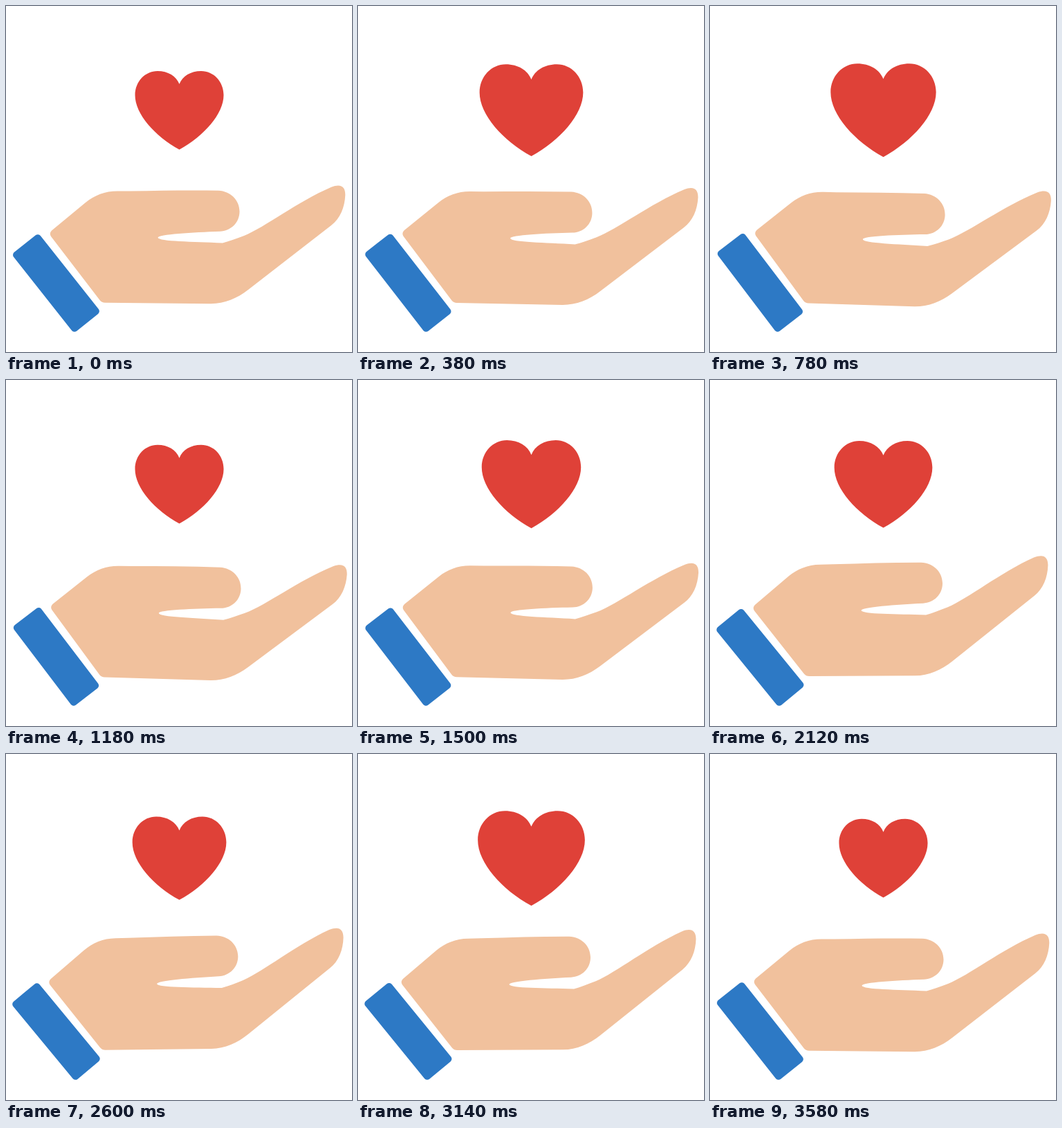
Recreate the animation shown at these times as an HTML page with a canvas. Size 500x500 px, loop 3620 ms.

```html
<!DOCTYPE html>
<html lang="en">
<head>
<meta charset="utf-8">
<title>Heart above a hand</title>
<style>
html, body { margin: 0; width: 100%; height: 100%; overflow: hidden; background: #fff; }
canvas { display: block; }
</style>
</head>
<body>
<canvas id="stage" width="500" height="500"></canvas>
<script>
const ctx = document.getElementById('stage').getContext('2d');
const LOOP = 3620, CYCLE = 3600;
const TILT = 0.021;
const PIVOT = [100, 400];
const HEART = [250.5, 150.2];

const heart = new Path2D(
  'M0 -37.5 C-4.5 -49 -16.5 -56.3 -31.5 -56.3 C-49.5 -56.3 -64 -41 -64 -21.5' +
  'C-64 6 -35 38 0 57.2 C35 38 64 6 64 -21.5 C64 -41 49.5 -56.3 31.5 -56.3' +
  'C16.5 -56.3 4.5 -49 0 -37.5 Z');

const hand = new Path2D(
  'M66 324.5 L115 284 C128 273.5 143 267.5 161 267.5 L180 267.5' +
  'C222 266.8 264 266 307 266.7 C324 267.5 337.5 280 337.5 297' +
  'C337.5 313 325 325.2 309 325.7 C270 327 219.5 330 219.5 334.7' +
  'C221 340.3 270 340.5 313 342.5 C323 340 333 336 344 332' +
  'C374 320 421 283 470 261.8 C484 256.5 490.3 261 490.3 273' +
  'C489.5 291 483 307 470 317 L350 410 C334 422.5 316 430 296 430.2' +
  'L143 428.7 C140 428.7 137.5 427.5 135.5 425 L65 333 C63 330 63.5 327 66 324.5 Z');

const cuff = new Path2D();
roundedPolygon(cuff, [[8, 358.9], [46.7, 328.1], [136.9, 441.8], [98.2, 472.9]], 5);

function roundedPolygon(path, points, radius) {
  const [first, second] = points;
  path.moveTo((first[0] + second[0]) / 2, (first[1] + second[1]) / 2);
  for (let i = 1; i <= points.length; i++) {
    const corner = points[i % points.length];
    const next = points[(i + 1) % points.length];
    path.arcTo(...corner, ...next, radius);
  }
  path.closePath();
}

const easeInOut = p => p < 0.5 ? 4 * p ** 3 : 1 - 4 * (1 - p) ** 3;

function swing(t) {
  const keys = [[0, 0], [800, 1], [2800, -1], [CYCLE, 0]];
  const i = Math.max(1, keys.findIndex(([time]) => t <= time));
  const [t0, v0] = keys[i - 1], [t1, v1] = keys[i];
  return v0 + (v1 - v0) * easeInOut((t - t0) / (t1 - t0));
}

function fill(path, color) {
  ctx.fillStyle = color;
  ctx.fill(path);
}

function draw(now) {
  const t = Math.min(now % LOOP, CYCLE);
  ctx.fillStyle = '#fff';
  ctx.fillRect(0, 0, 500, 500);

  ctx.save();
  ctx.translate(...PIVOT);
  ctx.rotate(TILT * swing(t));
  ctx.translate(-PIVOT[0], -PIVOT[1]);
  fill(hand, '#f1c19d');
  fill(cuff, '#2d79c5');
  ctx.restore();

  const scale = 1.12 - 0.12 * Math.cos(t / CYCLE * 6 * Math.PI);
  ctx.save();
  ctx.translate(...HEART);
  ctx.scale(scale, scale);
  fill(heart, '#df4138');
  ctx.restore();
}

const start = performance.now();
function tick() {
  draw(performance.now() - start);
  requestAnimationFrame(tick);
}
tick();
</script>
</body>
</html>
```
